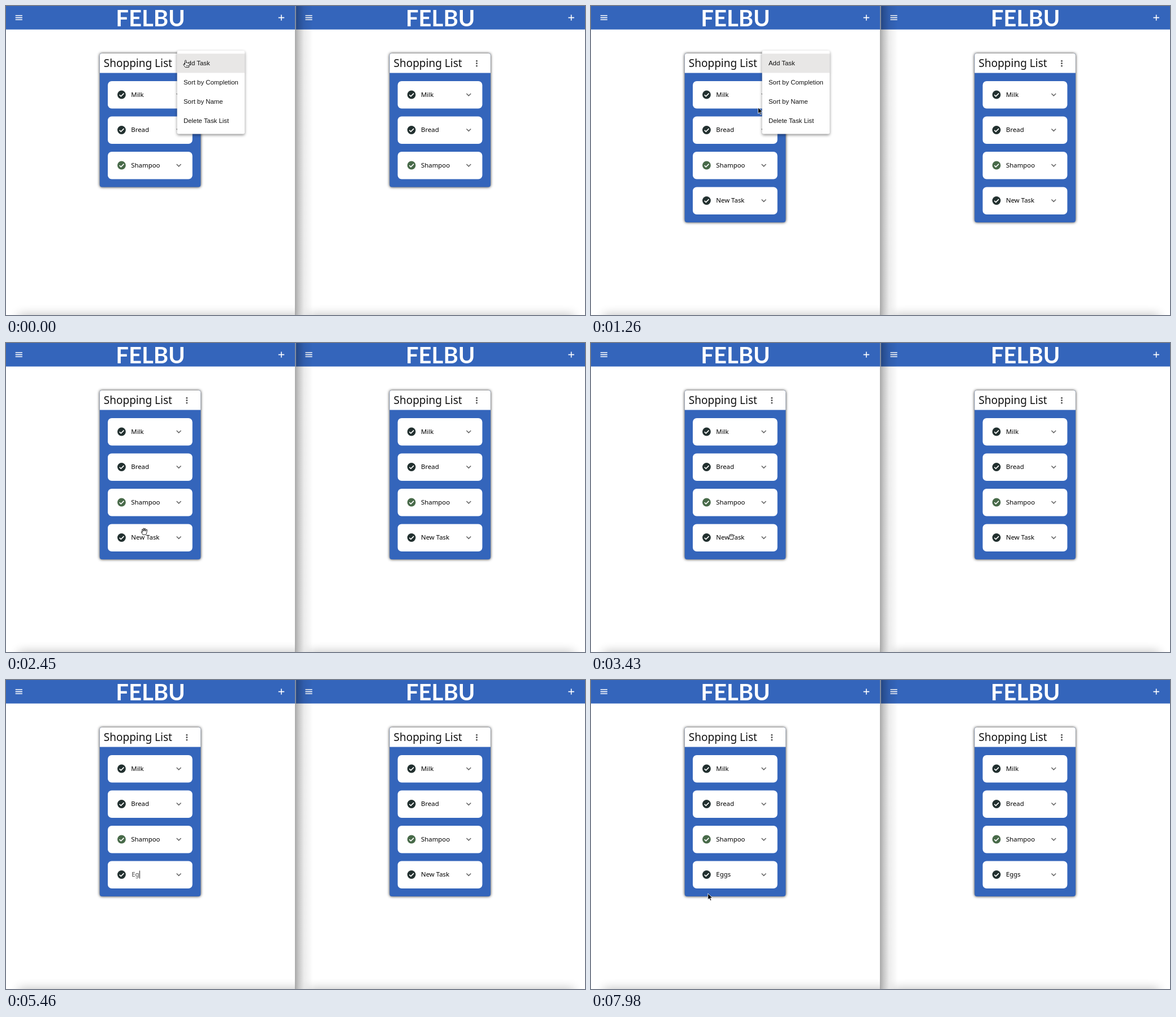
Animation of 1024 by 547 pixels, one loop 8000 ms. Source, as an HTML page:

```html
<!DOCTYPE html>
<html lang="en">
<head>
<meta charset="utf-8">
<title>Shared task list</title>
<style>
  html, body { margin: 0; width: 100%; height: 100%; overflow: hidden; background: #fff; }
  svg { display: block; width: 100vw; height: 100vh; }
  text { font-family: "Noto Sans", sans-serif; }
  .logo { font: 700 40px Lato, sans-serif; fill: #fff; text-anchor: middle; }
  .title { font-size: 19px; fill: #111; }
  .task { font-size: 11.4px; font-weight: 500; fill: #000; }
  .task.editing { font-weight: 400; fill: #444; }
  .menu text { font: 11.4px "Liberation Sans", Arial, sans-serif; fill: #111; }
  .blue { fill: #3465bb; }
  .card { filter: drop-shadow(0 0 2.6px rgba(0, 0, 0, .85)); }
  .menu { filter: drop-shadow(0 2px 2.5px rgba(0, 0, 0, .45)); }
  .line { fill: none; stroke: #fff; stroke-width: 1.6; }
  .chevron { fill: none; stroke: #666; stroke-width: 1.5; }
  .cursor path { stroke-linejoin: round; stroke-linecap: round; }
</style>
</head>
<body>
<svg id="stage" viewBox="0 0 1024 547" preserveAspectRatio="none">
  <defs>
    <linearGradient id="edge">
      <stop offset="0" stop-opacity=".34"/>
      <stop offset=".2" stop-opacity=".22"/>
      <stop offset=".5" stop-opacity=".08"/>
      <stop offset="1" stop-opacity="0"/>
    </linearGradient>
    <filter id="soft" x="-20%" y="-200%" width="140%" height="500%"><feGaussianBlur stdDeviation="9"/></filter>
    <clipPath id="half"><rect width="511.3" height="547"/></clipPath>
  </defs>
  <g id="panels"></g>
  <rect x="511" width="32" height="547" fill="url(#edge)"/>
  <g id="menu" class="menu"></g>
  <g id="cursor" class="cursor"></g>
</svg>
<script>
const $ = id => document.getElementById(id);
const STEP = 70, LOOP = 8000, ROW = 62.5;

const ADDED = { left: 490, right: 980 };
const RENAMED = { left: 6300, right: 6650 };
const MENU_CLOSE = 1400, MENU_FADE = 210;
const EDIT_START = 3780, SELECT_WORD = 4060, SELECT_ALL = 4900;
const TYPED = [[5180, ''], [5250, 'E'], [5460, 'Eg'], [5600, 'Egg'], [5740, 'Eggs']];

const row = (name, i, color, id = '') => `
  <g id="${id}" transform="translate(0 ${i * ROW})">
    <rect x="180" y="133" width="149.7" height="48.5" rx="7" fill="#fff"/>
    <circle cx="204.4" cy="157" r="7.4" fill="${color}"/>
    <path class="line" d="M200.6 157.2l2.7 2.7 5.2-5.3"/>
    <g class="edit"></g>
    <text class="task" x="221.3" y="160.7">${name}</text>
    <path class="chevron" d="M301.7 155l3.9 3.9 3.9-3.9"/>
  </g>`;

const panel = (side, dx) => `
  <g transform="translate(${dx})" clip-path="url(#half)">
    <rect x="22" y="546" width="${side === 'left' ? 520 : 470}" height="40" opacity=".24" filter="url(#soft)"/>
    <rect class="blue" x="-2" width="516" height="41.6"/>
    <path class="line" d="M16.7 17h12.2M16.7 20.6h12.2M16.7 24.2h12.2M481.8 20.6h10.4M487 15.4v10.4"/>
    <text class="logo" x="255.5" y="36">FELBU</text>
    <g class="card">
      <rect id="${side}Card" class="blue" x="165.8" y="84" width="178.4" rx="4"/>
      <path d="M165.8 118.6V88q0-4 4-4h170.4q4 0 4 4v30.6z" fill="#fff"/>
    </g>
    <text class="title" x="172.8" y="107.8">Shopping List</text>
    <g fill="#555">${[97.2, 101.6, 106].map(y => `<circle cx="319.8" cy="${y}" r="1.5"/>`).join('')}</g>
    ${row('Milk', 0, '#22302f')}${row('Bread', 1, '#22302f')}${row('Shampoo', 2, '#486a49')}
    ${row('New Task', 3, '#22302f', side + 'Row')}
  </g>`;

$('panels').innerHTML = panel('left', 0) + panel('right', 512.7);
$('menu').innerHTML = `
  <rect x="302.6" y="79" width="119.6" height="147.6" rx="3" fill="#fff"/>
  <rect x="302.6" y="84.4" width="119.6" height="34" fill="#e8e7e6"/>` +
  ['Add Task', 'Sort by Completion', 'Sort by Name', 'Delete Task List']
    .map((label, i) => `<text x="314" y="${105.2 + i * 34}">${label}</text>`).join('');

// Cursor drawings are placed relative to the pointer position.
const hand = d => `<path d="${d}" fill="#fff" stroke="#222" stroke-width="1"/>`;
const CURSORS = {
  arrow: '<path d="M0 0v10.5l2.5-2.2 1.8 4 1.8-.8-1.8-3.9h3.4z" fill="#000" stroke="#fff" stroke-width=".8"/>',
  point: hand('M-1.5 7V.8q0-1.3 1.1-1.3T.8.8v3.4q1.2-.7 2 .3 1.2-.6 2 .4 1.6-.5 1.8 1.2 0 3-1.3 6H-.8L-4 7.7q-.7-1.4.5-1.5z') +
    '<path d="M1 8v2.3M2.8 8v2.3M4.5 8v2.3" stroke="#222" stroke-width=".7"/>',
  open: hand('M-2.5 5.5L-5 1.6q-.3-1.5 1-1.2l1.3 1.4-1.2-4.5q0-1.4 1.3-1L-1.4-.6V-4.7q.2-1.2 1.3-.9L.3-.8l.8-3.8q1-1.1 1.6 0L2.3-.3l1.4-2.9q1.3-.7 1.6.5Q4.8 2.8 3.5 5.5z'),
  grab: hand('M-2.3 4.8L-4 2.3q-.8-1.6.8-2l-.4-2.2q.4-1.5 1.6-1 .7-1.3 1.8-.5 1-1 1.9 0 1.8-.5 2.3 1.5Q4.4 2 3 4.8z') +
    '<path d="M-1.7-2.2v2M0-2.5v2.2M1.9-2.5v2.2" stroke="#222" stroke-width=".8"/>',
  beam: '<path d="M-2.3-5.2Q0-5 0-3.6V3.8Q0 5.2-2.3 5.4M2.3-5.2Q0-5 0-3.6M0 3.8Q0 5.2 2.3 5.4M-1.2 1.7h2.4" fill="none" stroke="#222" stroke-width="1"/>',
  none: ''
};

// [time, x, y, shape from this time on]
const PATH = [
  [0, 318, 96.5, 'point'], [560, 318, 96.5, 'point'], [980, 301, 166, 'arrow'], [1120, 295.5, 180, 'arrow'],
  [1400, 295.5, 180, 'arrow'], [1470, 286, 205, 'open'], [1680, 246.5, 314, 'open'], [1890, 246, 325, 'open'],
  [2100, 245, 332, 'open'], [2450, 244.3, 333.5, 'open'], [2870, 246.5, 341, 'open'], [2940, 247.5, 342.5, 'open'],
  [3290, 248, 342.5, 'grab'], [3570, 248, 342.5, 'open'], [EDIT_START, 248, 344, 'beam'],
  [4060, 254, 346, 'beam'], [4480, 241.5, 347, 'beam'], [5180, 241.5, 347, 'none'],
  [7350, 241.5, 347, 'open'], [7560, 226, 362, 'open'], [7700, 214, 372, 'arrow'], [7840, 206.8, 378.3, 'arrow'], [LOOP, 206.8, 378.3, 'arrow']
];

function pointerAt(t) {
  const i = PATH.findIndex((key, n) => n === PATH.length - 1 || t < PATH[n + 1][0]);
  const a = PATH[i], b = PATH[i + 1] || a;
  const p = (t - a[0]) / (b[0] - a[0] || 1), ease = p * p * (3 - 2 * p);
  return { x: a[1] + (b[1] - a[1]) * ease, y: a[2] + (b[2] - a[2]) * ease, shape: a[3] };
}

function drawSide(side, t) {
  const added = t >= ADDED[side], item = $(side + 'Row');
  $(side + 'Card').setAttribute('height', added ? 299 : 236.6);
  item.style.display = added ? '' : 'none';
  const label = item.querySelector('.task'), marks = item.querySelector('.edit');
  const editing = side === 'left' && t >= EDIT_START && t < RENAMED.left;
  let name = t >= RENAMED[side] ? 'Eggs' : 'New Task';
  if (editing) for (const [time, value] of TYPED) if (t >= time) name = value;
  label.textContent = name;
  label.classList.toggle('editing', editing);
  label.setAttribute('x', editing ? 222.2 : 221.3);

  let mark = '';
  if (editing && t >= TYPED[0][0]) {
    const caret = 222.6 + (name ? label.getComputedTextLength() : 0);
    mark = `<rect x="${caret}" y="150" width="1" height="14" fill="#222"/>`;
  } else if (editing && t >= SELECT_WORD) {
    const x = t < SELECT_ALL ? 249.5 : 222;
    mark = `<rect x="${x}" y="149.6" width="${274 - x}" height="14.6" fill="#b3d2fb"/>`;
  }
  marks.innerHTML = mark;
}

function draw(now) {
  const t = Math.floor(now % LOOP / STEP) * STEP;
  drawSide('left', t);
  drawSide('right', t);
  $('menu').style.opacity = Math.max(0, Math.min(1, 1 - (t - MENU_CLOSE) / MENU_FADE));
  const { x, y, shape } = pointerAt(t);
  $('cursor').innerHTML = CURSORS[shape];
  $('cursor').setAttribute('transform', `translate(${x} ${y})`);
}

const start = performance.now();
(function tick() {
  draw(performance.now() - start);
  requestAnimationFrame(tick);
})();
</script>
</body>
</html>
```
